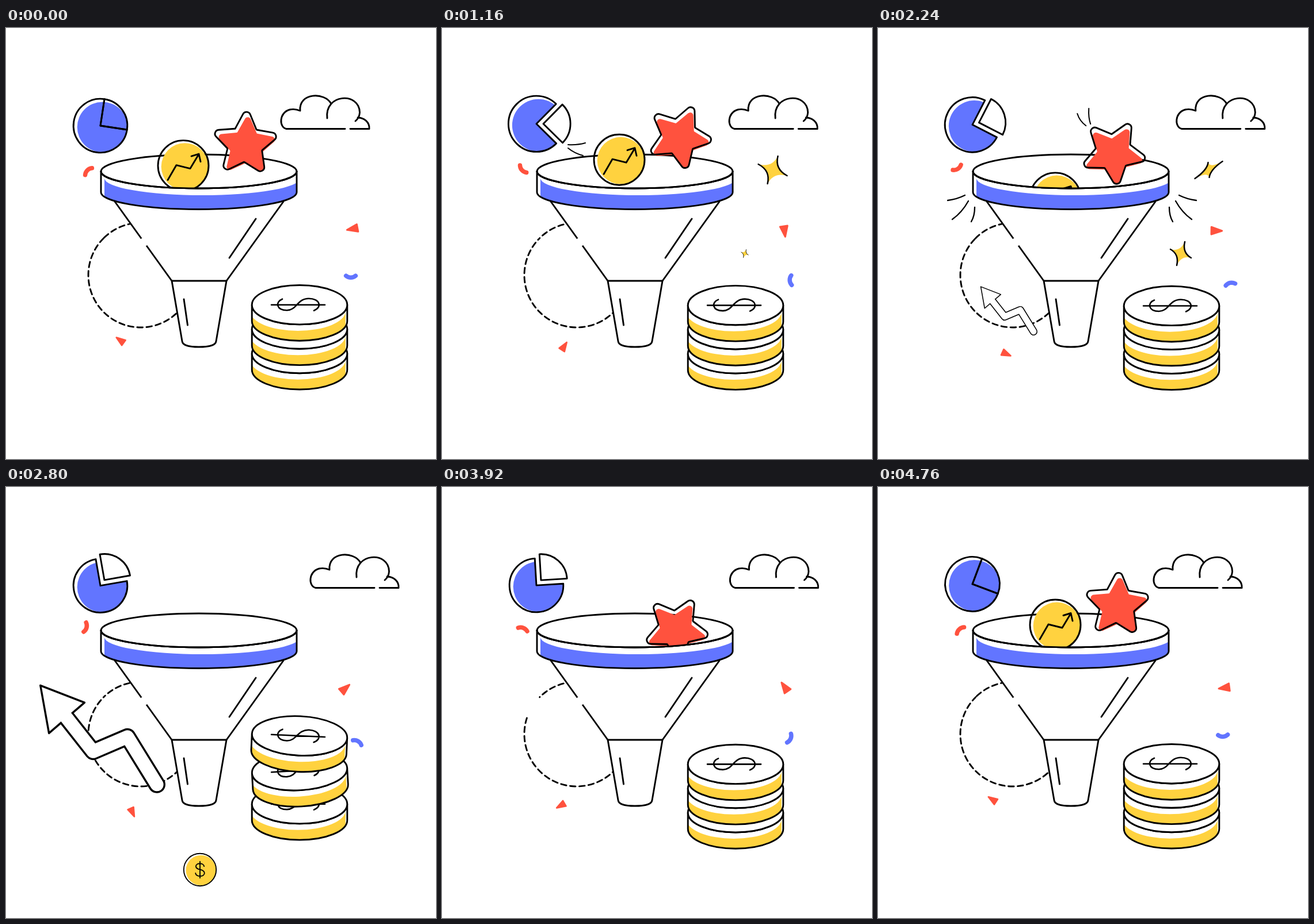
These frames come from a looping animation (747 px wide and 750 px high, 4800 ms). An HTML page with a canvas:

```html
<!DOCTYPE html>
<html lang="en">
<head>
<meta charset="utf-8">
<title>Sales funnel</title>
<style>
html, body { margin: 0; width: 100%; height: 100%; overflow: hidden; background: #fff; }
canvas { display: block; }
</style>
</head>
<body>
<canvas id="stage" width="747" height="750"></canvas>
<script>
const ctx = document.getElementById('stage').getContext('2d');
const LOOP = 4800, STEP = 40, TAU = Math.PI * 2, RAD = Math.PI / 180;
const BLACK = '#000', WHITE = '#fff', RED = '#ff523e', BLUE = '#6275ff', YELLOW = '#ffd23f';
const LINE = 2.9;
const RIM = { x: 335, y: 249.5, rx: 170, ry: 29.5 };
const COIN = { rx: 82.8, ry: 34.2, height: 28.3, gap: 42.4 };

// Motion helpers
function ease(t, from, to) {
  const u = Math.min(1, Math.max(0, (t - from) / (to - from)));
  return u * u * (3 - 2 * u);
}
const arch = (t, from, to) => t > from && t < to ? Math.sin(Math.PI * (t - from) / (to - from)) : 0;
const there = (t, peak) => t < peak ? t / peak : (LOOP - t) / (LOOP - peak);
const within = (t, from, to) => t >= from && t < to;
// Keeps a bob continuous across the end of the loop.
const around = (t) => t > 3000 ? t - LOOP : t;

// Drawing helpers
function fill(path, color) { ctx.fillStyle = color; ctx.fill(path); }
function stroke(path, width = LINE, color = BLACK) {
  ctx.lineWidth = width;
  ctx.strokeStyle = color;
  ctx.stroke(path);
}
const draw = (d, width, color) => stroke(new Path2D(d), width, color);
function place(x, y, angle, scale, paint) {
  ctx.save();
  ctx.translate(x, y);
  ctx.rotate(angle);
  ctx.scale(scale, scale);
  paint();
  ctx.restore();
}
function clipped(path, paint) {
  ctx.save();
  ctx.clip(path);
  paint();
  ctx.restore();
}
function oval(x, y, rx, ry = rx, from = 0, to = TAU) {
  const p = new Path2D();
  p.ellipse(x, y, rx, ry, 0, from, to);
  return p;
}
// Flat cylinder with a tinted side; the tint is shifted against the outline.
function cylinder(x, y, rx, ry, height, color, dx, dy) {
  const wall = (x, y, h) => {
    const p = new Path2D();
    p.ellipse(x, y, rx, ry, 0, Math.PI, 0, true);
    p.lineTo(x + rx, y + h);
    p.ellipse(x, y + h, rx, ry, 0, 0, Math.PI);
    p.closePath();
    return p;
  };
  const side = wall(x, y, height), top = oval(x, y, rx, ry);
  fill(side, WHITE);
  clipped(side, () => fill(wall(x + dx, y + dy, height * 2), color));
  stroke(side);
  fill(top, WHITE);
  stroke(top);
}

function ring(t) {
  const gap = 27 * (ease(t, 2740, 3920) - ease(t, 3940, 4500));
  const p = new Path2D();
  p.arc(234, 430, 91, (225 - gap) * RAD, -135 * RAD, true);
  ctx.setLineDash([9.6, 6.4]);
  ctx.lineDashOffset = -t / LOOP * 176;
  stroke(p);
  ctx.setLineDash([]);
}

function arrow(t) {
  const grow = (start, end) => ease(t, start, start + 320) - ease(t, end - 120, end);
  const scale = 2.13 * (grow(2090, 2960) + grow(3215, 3900));
  if (scale < .02) return;
  const shaft = 'M-81-64 L-59-36 L-31-48 L-7-9', head = new Path2D('M-102-90 L-66-76 L-95-51 Z');
  place(277, 537, 0, scale, () => {
    draw(shaft, 14);
    fill(head, WHITE);
    stroke(head, 1.6);
    draw(shaft, 10.8, WHITE);
  });
}

function token(r) {
  fill(oval(2.7, 1.6, r - 3), YELLOW);
  stroke(oval(0, 0, r));
}
function dollar(age) {
  if (!within(age, 0, 440)) return;
  const below = new Path2D('M0 555 H747 V750 H0 Z');
  const y = Math.min(666, 510 + .45 * age);
  clipped(below, () => place(337, y, 0, 1 - ease(age, 340, 440), () => {
    token(43.5);
    draw('M11-9 C10-19-11-19-11-9 C-11 2 12-3 12 9 C12 20-11 20-12 9 M0-22 V22');
  }));
}

function funnel() {
  const cone = new Path2D('M189 302 L288 440 L306 545 Q307 555 335 555 Q364 555 365 545 L383 440 L482 302');
  fill(cone, WHITE);
  stroke(cone);
  draw('M237.5 369 L242 376', 7, WHITE);
  draw('M288 440 H383 M434 332 L388 400 M309 472 L315.5 517');
  cylinder(RIM.x, RIM.y, RIM.rx, RIM.ry, 36.5, BLUE, 6, 12);
}

// Draws items that sit inside the funnel, hidden by the front of its rim.
function inFunnel(paint) {
  const mouth = new Path2D('M0 249.5 V0 H747 V249.5');
  mouth.ellipse(RIM.x, RIM.y, RIM.rx, RIM.ry, 0, 0, Math.PI);
  clipped(mouth, paint);
  stroke(oval(RIM.x, RIM.y, RIM.rx, RIM.ry, 0, Math.PI));
}

function trendBall(t) {
  const bob = 231 + 9 * Math.cos(around(t) / 940 * TAU + .3);
  const sink = 108 * (ease(t, 2085, 2335) - ease(t, 3960, 4200));
  place(308, bob + sink - 30 * arch(t, 4100, 4600), 0, 1, () => {
    token(44);
    draw('M-27 25 L-12-1 L12 5 L27-20 M14-16.5 L27-20.5 L30-7');
  });
}

function starPath(outer, inner, round) {
  const p = new Path2D();
  const at = (i) => {
    const r = i % 2 ? inner : outer, a = i * Math.PI / 5 - Math.PI / 2;
    return [r * Math.cos(a), r * Math.sin(a)];
  };
  p.moveTo(...at(-1));
  for (let i = 0; i < 10; i++) p.arcTo(...at(i), ...at(i + 1), i % 2 ? 1.5 : round);
  p.closePath();
  return p;
}
const STAR = starPath(65, 31.5, 7), STAR_FILL = starPath(58, 29, 5.5);
function star(t) {
  const bob = 196 + 10 * Math.cos(around(t) * .012 + .98);
  const sink = 160 * (ease(t, 2120, 2560) - ease(t, 3780, 4020));
  const tilt = (21 + 6 * ease(t, 1160, 2400)) * (ease(t, 0, 500) - ease(t, 4100, 4780));
  const x = 415.3 - .15 * tilt - .07 * sink, y = bob + sink - 45 * arch(t, 4000, 4560);
  place(x, y, (3 + tilt) * RAD, 1, () => {
    place(2.5, 4.5, 0, 1, () => fill(STAR_FILL, RED));
    stroke(STAR);
  });
  if (within(t, 400, 640) || within(t, 2120, 2360))
    place(x, y, 0, 1, () => draw('M-63-67 Q-59-54-48-46 M-43-76 Q-44-60-40-49', 2));
}

function sector(r, from, to) {
  const p = new Path2D();
  p.arc(0, 0, r, from, to);
  p.lineTo(0, 0);
  p.closePath();
  return p;
}
function pie(t) {
  const swing = 36 * ease(t, 580, 900) - 72 * ease(t, 1740, 3300) + 48 * ease(t, 3320, 4520);
  const apart = 12 * (ease(t, 600, 760) - ease(t, 4360, 4560));
  const quarter = Math.PI / 2, from = (8.6 + swing) * RAD - quarter, mid = from + quarter / 2;
  const r = 46.8 + .05 * Math.max(0, swing);
  place(164, 170 - .09 * swing, 0, 1, () => {
    const body = sector(r, from + quarter, from + TAU);
    const wedge = sector(r - apart / 8, from, from + quarter);
    const tint = () => fill(oval(3.5, 2.5, r - 3), BLUE);
    clipped(body, tint);
    if (apart < 1) clipped(wedge, tint);
    stroke(body);
    place(apart * Math.cos(mid), apart * Math.sin(mid), 0, 1, () => stroke(wedge));
  });
  if (within(t, 960, 1240)) draw('M219 203 Q235 204 249 200 M219 209 Q230 218 245 222', 2);
}

function bursts(t) {
  if (!within(t, 2160, 2440) && !within(t, 3200, 3480)) return;
  for (const side of [-1, 1]) {
    ctx.save();
    ctx.translate(337, 0);
    ctx.scale(side, 1);
    draw('M186 291 Q200 298 216 300 M180 301 Q191 321 208 333 M169 312 Q169 327 175 337', 2.3);
    ctx.restore();
  }
}

function cloud(t) {
  place(51 * there(t, 2800), 0, 0, 1, () => draw('M589 175.5 H487 C474 173 474 147 493 142 ' +
    'Q502 140 511 144 C508 112 554 111 565 132 M558 157 C553 114 614 111 614.5 147 ' +
    'Q614 156 607 162 M611 156 C622 156 632 164 631 175.5 H598'));
}

// Four-pointed sparkle with tips at +a, +b, -a, -b; only two edges are inked.
function sparkle(x, y, a, b, scale) {
  if (scale < .03) return;
  const minus = (v) => v.map(n => -n);
  const edge = (path, p, q) => path.quadraticCurveTo((p[0] + q[0]) * .1, (p[1] + q[1]) * .1, ...q);
  const body = new Path2D(), ink = new Path2D();
  const tips = [a, b, minus(a), minus(b)];
  body.moveTo(...a);
  tips.forEach((tip, i) => {
    const next = tips[(i + 1) % 4];
    edge(body, tip, next);
    if (i % 2) return;
    ink.moveTo(...tip);
    edge(ink, tip, next);
  });
  place(x, y, 0, scale, () => { fill(body, YELLOW); stroke(ink, 2.5); });
}
function sparkles(t) {
  const k = ease(t, 1160, 2240), mix = (u, v) => u + (v - u) * k;
  sparkle(574.5, 247, [mix(9, 24), mix(-24, -15)], [mix(25, 1), mix(10, 13)],
    ease(t, 860, 1120) - ease(t, 2240, 2440));
  sparkle(526, 392.5, [7, -20.5], [18, 7.5], ease(t, 980, 1440) - ease(t, 2320, 2560));
}

function chip(x, y, angle, color) {
  place(x, y, angle, 1, () => stroke(oval(-11.3, 0, 13, 13, -.7, .7), 7.5, color));
}
function shard(x, y, angle, scale) {
  const p = new Path2D('M12.5 0 L-6 6.5 V-6.5 Z');
  place(x, y, angle, scale, () => { fill(p, RED); stroke(p, 3, RED); });
}
function confetti(t) {
  const spin = t / LOOP * TAU, drift = there(t, 2400);
  chip(142.5 - 5 * drift, 248.8 - 5.5 * drift, 225 * RAD - spin, RED);
  chip(599 + 14 * drift, 432.5 + 13.5 * drift, 90 * RAD + spin, BLUE);
  shard(604.7 - 21 * drift, 349 + 4 * drift, 169 * RAD - spin, 1);
  shard(200.3 + 22 * drift, 544.7 + 23 * drift, 216 * RAD + spin, .85);
}

// Higher coins jump further and land later.
function coins(t) {
  for (let i = 0; i < 3; i++) {
    const air = 820 + 90 * i;
    const hop = arch(t, 0, air) + arch(t, 2570, 2570 + air);
    const tilt = [0, -3.8, 3.2][i] * Math.sqrt(hop);
    const rest = 566.5 - COIN.gap * i + (.7 + .6 * i) * there(t, 2400);
    place(510, rest - (20 + 28 * i * (.75 + .125 * i)) * hop, tilt * RAD, 1, () => {
      cylinder(0, 0, COIN.rx, COIN.ry, COIN.height, YELLOW, -3, 11);
      draw('M-30-10 C-43-5-40 9.5-22 9.5 C-5 9.5-4-11 16-11 C35-11 40 4 25 10 M-49 0 H44', 2.6);
    });
  }
}

function render(t) {
  ctx.fillStyle = WHITE;
  ctx.fillRect(0, 0, 747, 750);
  ctx.lineCap = ctx.lineJoin = 'round';
  ring(t);
  arrow(t);
  dollar(t - 2420);
  dollar(t - 3120);
  funnel();
  inFunnel(() => { trendBall(t); star(t); });
  bursts(t);
  pie(t);
  cloud(t);
  sparkles(t);
  confetti(t);
  coins(t);
}

const began = performance.now();
function tick() {
  const t = (performance.now() - began) % LOOP;
  render(Math.floor(t / STEP) * STEP);
  requestAnimationFrame(tick);
}
tick();
</script>
</body>
</html>
```
